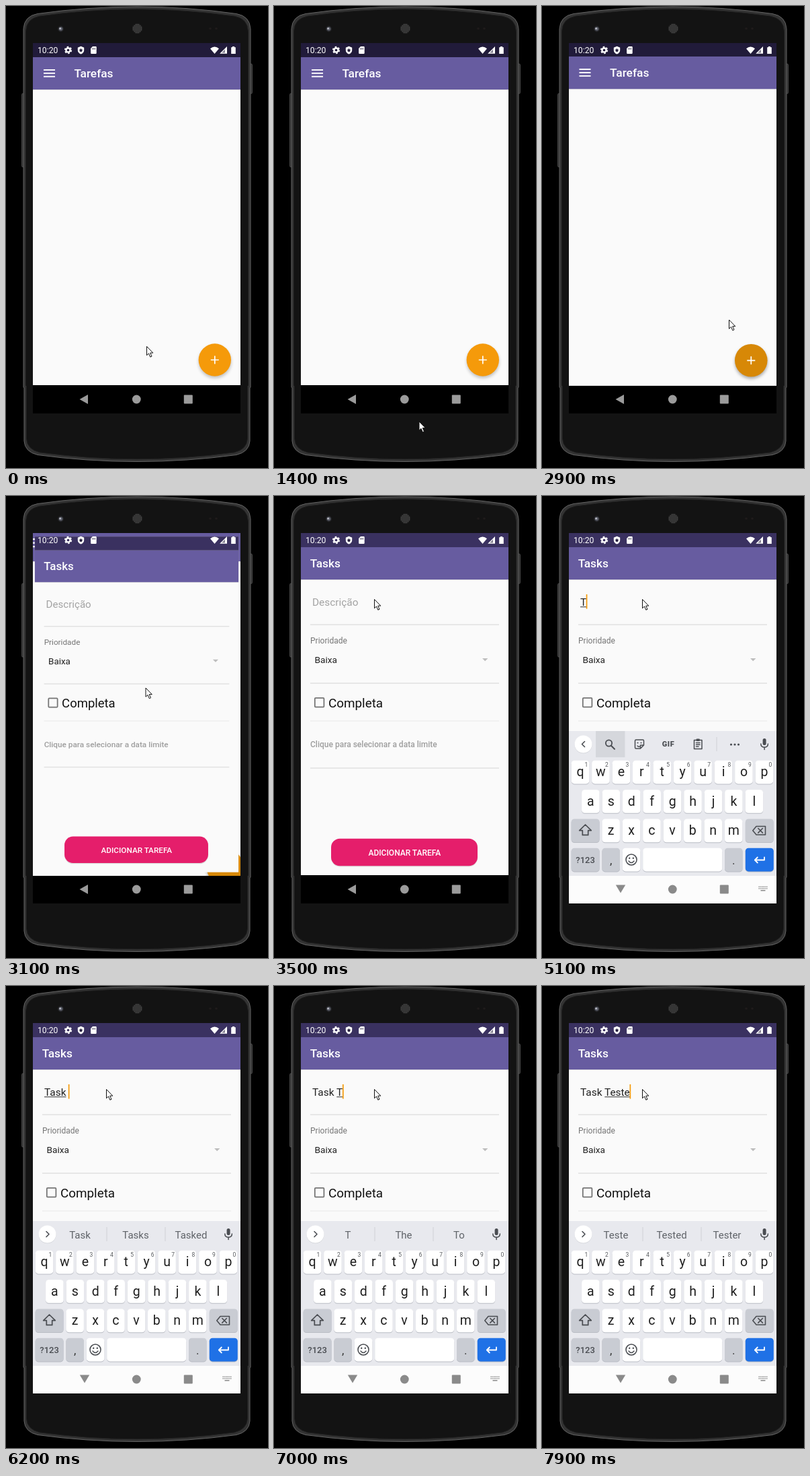
Animation of 390 by 686 pixels, one loop 8000 ms. Source, as an HTML page:

```html
<!DOCTYPE html>
<html lang="pt">
<head>
<meta charset="utf-8">
<title>Tarefas</title>
<style>
html, body { margin: 0; width: 100%; height: 100%; overflow: hidden; background: #000; }
svg { display: block; width: 390px; height: 686px; }
text { font-family: Roboto, sans-serif; white-space: pre; }
.m { font-weight: 500; }
.c { text-anchor: middle; }
.line { fill: none; stroke-linecap: round; stroke-linejoin: round; }
</style>
</head>
<body>
<svg id="stage" viewBox="0 0 390 686" xmlns="http://www.w3.org/2000/svg"></svg>
<script>
const LOOP = 8000, TICK = 100, ORANGE = '#f59a0a', PURPLE = '#675ca0';

// Markup helpers
const rect = (x, y, w, h, fill, rx = 0, more = '') =>
  `<rect x="${x}" y="${y}" width="${w}" height="${h}" rx="${rx}" fill="${fill}" ${more}/>`;
const disc = (x, y, r, fill, more = '') => `<circle cx="${x}" cy="${y}" r="${r}" fill="${fill}" ${more}/>`;
const shape = (d, fill, more = '') => `<path d="${d}" fill="${fill}" ${more}/>`;
const line = (d, color, w = 1.5, more = '') =>
  `<path class="line" d="${d}" stroke="${color}" stroke-width="${w}" ${more}/>`;
const text = (x, y, size, fill, str, cls = '', more = '') =>
  `<text x="${x}" y="${y}" font-size="${size}" fill="${fill}" class="${cls}" ${more}>${str}</text>`;
const group = (id, body, more = '') => `<g id="${id}" ${more}>${body}</g>`;

function phone() {
  const body = 'M26 34 Q27 15 47 11.5 Q195 -9.5 343 11.5 Q363 15 364 34 V566 L363 567 V646 ' +
    'Q362 662 343 666.500 Q195 686.500 47 666.500 Q28 662 27 646 V567 L26 566 Z'.replace(/00\b/g, '');
  let mesh = '';
  for (let y = -6; y <= 6; y += 2)
    for (let x = -6; x <= 6; x += 2)
      if (x * x + y * y < 44) mesh += disc(195.5 + x, 33.5 + y, 0.65, '#585858');
  return rect(23.5, 130, 4, 109, '#2e2e2e', 1.5, 'stroke="#5c5c5c" stroke-width=".7"') +
    rect(362.5, 86, 4, 44, '#2e2e2e', 1.5, 'stroke="#5c5c5c" stroke-width=".7"') +
    shape(body, '#333', 'stroke="#646464"') +
    shape(body, '#131313', 'transform="translate(195 338) scale(.979 .989) translate(-195 -338)" stroke="#1f1f1f"') +
    disc(81.5, 34, 4.4, '#26272a') + disc(81.5, 34, 2.8, '#5c5f6b') + disc(80.6, 33.4, 1.3, '#c2c4cc') +
    disc(195.5, 33.5, 7.6, '#242424') + mesh +
    disc(304, 33.5, 1.8, '#1f1b1b') + disc(313, 33.5, 1.8, '#1f1b1b');
}

const bar = (status, x, title) =>
  rect(40, 55, 309, 508, '#fafafa') + rect(40, 124, 309, 1, '#000', 0, 'opacity=".1"') +
  rect(40, 76, 309, 48, PURPLE) + rect(40, 55, 309, 21, status) +
  text(x, 106.3, 17.3, '#fff', title, 'm');

function home() {
  return bar('#211b3a', 101.5, 'Tarefas') +
    [94, 98.9, 103.8].map(y => rect(56, y, 17, 1.9, '#fff')).join('') +
    disc(311, 528.5, 24, '#000', 'id="shade" filter="url(#soft)"') +
    disc(310.8, 525.5, 24.2, ORANGE, 'id="fab"') +
    line('M304.8 525.5h12M310.8 519.5v12', '#fff', 1.7, 'style="stroke-linecap:butt"');
}

function form() {
  const rule = (y, color) => rect(54, y, 281, 1.4, color);
  return bar('#3a3160', 53.7, 'Tasks') +
    text(57, 163, 15.4, '#a3a3a3', 'Descrição', '', 'id="hint"') +
    text(57, 163, 15.4, '#212121', '', '', 'id="value"') +
    rect(57, 164.2, 0, 1, '#333', 0, 'id="under"') +
    rect(57, 146, 1.7, 21.5, ORANGE, 0, 'id="caret"') +
    rule(190.3, '#e0e0e0') + text(54, 218.6, 12, '#757575', 'Prioridade') +
    text(60.5, 248, 13.7, '#212121', 'Baixa') + shape('M310 241h8.4l-4.2 4.2z', '#bdbdbd') +
    rule(277.3, '#e0e0e0') +
    rect(60.8, 299.8, 13.6, 13.6, 'none', 1.2, 'stroke="#757575" stroke-width="1.8"') +
    text(81, 314, 18.85, '#111', 'Completa') + rule(333.3, '#eee') +
    text(54, 373.4, 12, '#9e9e9e', 'Clique para selecionar a data limite', 'm') +
    rule(403.3, '#e0e0e0') +
    rect(85, 510.5, 218, 40, '#000', 13, 'opacity=".12"') + rect(85, 508.8, 218, 40.4, '#e51e6b', 13) +
    text(194.3, 533.6, 12, '#fff', 'ADICIONAR TAREFA', 'm c');
}

function statusIcons() {
  return text(47, 70, 12.2, '#fff', '10:20') +
    disc(92.5, 65.5, 3.1, 'none', 'stroke="#fff" stroke-width="2.5"') +
    disc(92.5, 65.5, 4.8, 'none', 'stroke="#fff" stroke-width="1.8" stroke-dasharray="2.6 2.43"') +
    shape('M111.5 59.8l4.7 2v3.6q0 4-4.7 6.1q-4.7-2.1-4.7-6.1v-3.6z', '#fff') +
    shape('M111.5 62.8l.9 1.8 2 .3-1.4 1.5.3 2-1.8-1-1.8 1 .3-2-1.4-1.5 2-.3z', '#211b3a') +
    shape('M129 60h4.5q1.2 0 1.2 1.2v8.6q0 1.2-1.2 1.2h-6.2q-1.2 0-1.2-1.2v-6.8z', '#fff') +
    shape('M128.2 62.5h.9v2h-.9zM130 62.5h.9v2h-.9zM131.9 62.5h.9v2h-.9z', '#211b3a') +
    shape('M310.5 71L304 63.2Q310.5 57.8 317 63.2Z', '#fff') +
    shape('M329 60v10.8h-10.8z', '#fff') + shape('M326 64.6v4.8h-4.8z', '#211b3a', 'opacity=".55"') +
    shape('M337 60h3v1.2h1.8v9.8h-6.6v-9.8h1.8z', '#fff');
}

function nav() {
  const marks = color => disc(194.3, 584, 6.4, color) + rect(264.8, 577.6, 13, 13, color, 1);
  let keys = '';
  for (let i = 0; i < 12; i++)
    keys += rect(322.5 + i % 6 * 2.3, 579.5 + (i / 6 | 0) * 2.6, 1.4, 1.5, '#8a8a8a');
  return group('navDark', rect(40, 564, 309, 42, '#000') + shape('M109.5 584l12.5-7v14z', '#9b9b9b') + marks('#9b9b9b')) +
    group('navLight', rect(40, 564, 309, 42, '#fcfcfc') + shape('M109.8 577.6h14.4l-7.2 12z', '#8a8a8a') +
      marks('#8a8a8a') + keys + rect(325.5, 585, 7, 1.5, '#8a8a8a'));
}

function key(x, y, w, fill = '#fff') {
  return rect(x, y + 1, w, 34.6, '#b9bcc4', 4.5) + rect(x, y, w, 34.6, fill, 4.5);
}

function keyboard() {
  const ink = '#4a4d52', grey = '#c9ccd3', step = 30.43;
  const rows = [['qwertyuiop', 57], ['asdfghjkl', 72.4], ['zxcvbnm', 102.6]];
  let out = rect(40, 349, 309, 216, '#e8e9ee');
  rows.forEach(([letters, x0], r) => [...letters].forEach((ch, i) => {
    const x = x0 + i * step, y = 392.8 + r * 43.4;
    out += key(x - 13.3, y, 26.6) + text(x, y + 23.4, 19.5, '#1f1f1f', ch, 'c');
    if (!r) out += text(x + 9, y + 8.8, 8.5, '#55585c', (i + 1) % 10, 'c');
  }));
  out += key(43.6, 479.5, 42, grey) + key(302.8, 479.5, 42, grey) +
    line('M64.5 488l8.8 8.7h-4.6v6.7h-8.4v-6.7h-4.6z', ink, 1.7) +
    line('M319 490.5h13.5v12.5h-13.5l-5.2-6.2zM321.8 493.5l6.6 6.6M328.4 493.5l-6.6 6.6', ink, 1.6) +
    key(43.6, 522.8, 42, grey) + text(64.6, 545, 13, ink, '?123', 'm c') +
    key(89.4, 522.8, 26.6, grey) + text(102.6, 547, 17, '#333', ',', 'c') +
    key(119.8, 522.8, 26.6) + disc(133, 540, 8, 'none', `stroke="${ink}" stroke-width="1.6"`) +
    disc(130.2, 537.7, 1.2, ink) + disc(135.8, 537.7, 1.2, ink) + line('M129 542q4 5 8 0', ink) +
    key(150.2, 522.8, 118) + key(272, 522.8, 26.6, grey) + text(285.3, 547, 17, '#333', '.', 'c') +
    key(302.8, 522.8, 42, '#1f71e6') + line('M331 536.5v4h-14M320.8 536.5l-4 4 4 4', '#fff', 1.8);

  const mic = rect(328.6, 360, 5, 10, ink, 2.5) + line('M325.8 368q0 5 5.3 5t5.3-5M331.1 373v3.4', ink, 1.5);
  const split = x => rect(x, 358, 1, 21, '#cfd1d6');
  const tools = rect(80, 349, 43.5, 39, '#d5d7dc') +
    disc(99.5, 367, 4.6, 'none', `stroke="${ink}" stroke-width="1.8"`) + line('M103 370.7l5 5', ink, 2) +
    line('M151.5 370v-6.5q0-1.5-1.5-1.5h-10q-1.5 0-1.5 1.5v10q0 1.5 1.5 1.5h6.5zM146.5 375v-5h5M142 371q2 2 3.5 1', ink) +
    disc(142.5, 366.5, 1, ink) + disc(147.5, 366.5, 1, ink) +
    text(188, 372.4, 11, ink, 'GIF', 'c', 'font-weight="900" letter-spacing=".6"') +
    line('M226.5 362.5h11.5v13h-11.5zM229.5 366.5h5.5M229.5 369.3h5.5M229.5 372.1h3.5', ink) +
    rect(229.6, 360.5, 5.2, 3.5, ink, 1) + split(259.5) +
    [281.5, 287, 292.5].map(x => disc(x, 369, 1.6, ink)).join('') + line('M63.5 364.5l-4 4 4 4', ink, 1.6);
  const words = split(149.5) + split(236.5) + line('M60 364.5l4 4-4 4', ink, 1.6) +
    [110, 193, 275.5].map((x, i) => text(x, 374.5, 15, '#5f6368', '', 'c', `id="word${i}"`)).join('');
  return out + disc(61.5, 369.3, 13, '#cfd1d6') + disc(61.5, 368.5, 13, '#fff') + mic +
    group('tools', tools) + group('words', words);
}

document.getElementById('stage').innerHTML =
  `<defs><clipPath id="screen">${rect(40, 55, 309, 550, '#000')}</clipPath>
   <filter id="soft" x="-30%" y="-30%" width="160%" height="160%"><feGaussianBlur stdDeviation="2.5"/></filter></defs>` +
  phone() +
  group('view', rect(40, 55, 309, 550, '#000') + group('home', home()) + group('form', form()) +
    group('keys', keyboard()) + nav() + statusIcons(), 'clip-path="url(#screen)"') +
  shape('M0 0v13.2l3-2.8 2.3 5.3 2.2-1-2.3-5.1h4.1z', '#fff', 'id="mouse" stroke="#111"');

const el = Object.fromEntries([...document.querySelectorAll('[id]')].map(e => [e.id, e]));
const pen = document.createElement('canvas').getContext('2d');
const widthOf = s => (pen.font = '15.4px Roboto, sans-serif', pen.measureText(s).width);

// Pointer: time, x, y
const path = [
  [100, 209.5, 505.5], [300, 248, 570], [500, 303, 663], [600, 303, 663], [700, 299, 671], [800, 289, 652],
  [1000, 322, 588], [1100, 337, 549], [1200, 326, 529], [1399, 326, 529], [1400, 216, 617], [1500, 216, 617],
  [1600, 205, 611], [1800, 218, 588], [2100, 278, 543], [2400, 310, 521], [2700, 310, 521], [2800, 299, 499],
  [2900, 278.5, 466], [3000, 254, 423], [3100, 208, 285], [3200, 176, 205], [3500, 149.5, 153.5]
];
// Field: time, text, underline start and end
const typed = [
  [0, '', 0, 0], [4800, 'T', 0, 0], [5100, 'T', 0, 1], [5400, 'Ta', 0, 2], [5500, 'Tas', 0, 2], [5700, 'Tas', 0, 3],
  [6000, 'Task', 0, 4], [6200, 'Task ', 0, 4], [6400, 'Task ', 0, 0], [6900, 'Task T', 5, 6], [7200, 'Task Te', 5, 7],
  [7500, 'Task Tes', 5, 8], [7600, 'Task Teste', 5, 8], [7800, 'Task Teste', 5, 10]
];
const hints = [
  [0, ''], [5200, 'T,The,Thanks'], [5500, 'Ta,Take,Tax'], [5700, 'Tas,Task,Tax'], [6200, 'Task,Tasks,Tasked'],
  [6500, 'and,is,for'], [7000, 'T,The,To'], [7200, 'Te,Tell,To'], [7600, 'Test,Tests,Tested'], [7900, 'Teste,Tested,Tester']
];

const last = (table, t) => table.filter(row => row[0] <= t).pop();
const ramp = (t, a, b) => Math.min(1, Math.max(0, (t - a) / (b - a)));
const show = (node, on) => node.style.display = on ? '' : 'none';
const zoom = (node, s) =>
  node.setAttribute('transform', `translate(194.5 330) scale(${s}) translate(-194.5 -330)`);

function pointer(t) {
  const i = path.findIndex(p => p[0] > t);
  if (i < 1) return path[i ? path.length - 1 : 0].slice(1);
  const [a, b] = [path[i - 1], path[i]], k = ramp(t, a[0], b[0]);
  return [a[1] + (b[1] - a[1]) * k, a[2] + (b[2] - a[2]) * k];
}

function draw(t) {
  el.mouse.setAttribute('transform', `translate(${pointer(t)})`);
  el.fab.setAttribute('fill', t < 2700 ? ORANGE : t < 2800 ? '#e59109' : '#d78807');
  el.shade.setAttribute('opacity', t < 2700 ? 0.24 : 0.34);

  const open = ramp(t, 2850, 3350), k = 1 - (1 - open) ** 3;
  zoom(el.home, t <= 2900 ? 1 + 0.004 * ramp(t, 2800, 2900) : 1 + 0.15 * k);
  zoom(el.form, 0.85 + 0.15 * k);
  el.form.style.opacity = ramp(t, 2900, 3050);
  show(el.form, t > 2900);
  show(el.home, t < 3400);

  const rise = 1 - (1 - ramp(t, 3930, 4400)) ** 2;
  show(el.keys, t >= 4000);
  show(el.navLight, t >= 4000);
  show(el.navDark, t < 4000);
  el.keys.setAttribute('transform', `translate(0 ${216 * (1 - rise)})`);

  const [, value, from, to] = last(typed, t);
  el.value.textContent = value;
  show(el.hint, !value);
  el.under.setAttribute('x', 57 + widthOf(value.slice(0, from)));
  el.under.setAttribute('width', widthOf(value.slice(from, to)));
  el.caret.setAttribute('x', 56.5 + widthOf(value));
  show(el.caret, t >= 3700);

  const words = last(hints, t)[1];
  show(el.tools, !words);
  show(el.words, words);
  words.split(',').forEach((w, i) => el['word' + i].textContent = w);
}

const start = performance.now();
let shown = -1;
function tick() {
  const t = Math.floor((performance.now() - start) % LOOP / TICK) * TICK;
  if (t !== shown) draw(shown = t);
  requestAnimationFrame(tick);
}
tick();
</script>
</body>
</html>
```
